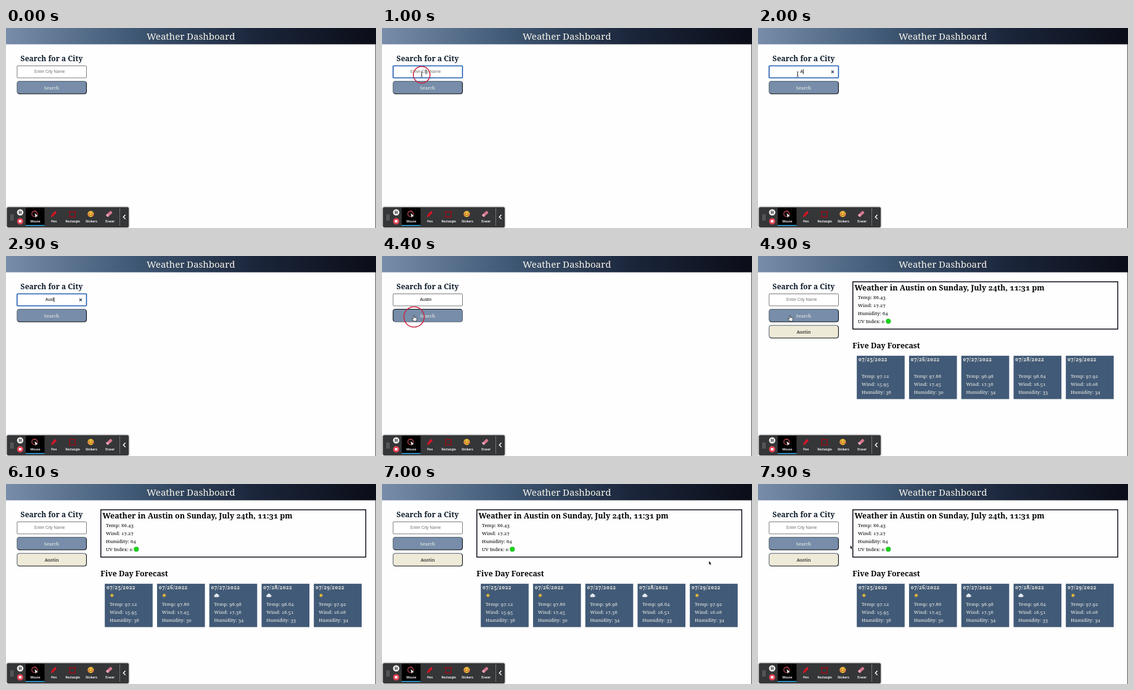
Write an HTML page that moves like this. It is 600 by 325 pixels and loops after 8000 ms.

```html
<!DOCTYPE html>
<html lang="en">
<head>
<meta charset="utf-8">
<title>Weather Dashboard</title>
<style>
  html, body { margin: 0; width: 100%; height: 100%; overflow: hidden; background: #fefefe; }
  svg { display: block; width: 100%; height: 100%; }
  text { white-space: pre; }
  .serif { font-family: "Noto Serif", serif; font-variant-numeric: oldstyle-nums; }
  .sans { font-family: "Liberation Sans", Arial, sans-serif; font-size: 6.75px; }
  .label { font: 500 5.2px Roboto, sans-serif; fill: #fff; }
  .medium { font-weight: 500; }
  .bold { font-weight: 700; }
  .mid { text-anchor: middle; }
  .floating { filter: drop-shadow(0 0 1.5px rgba(0, 0, 0, .6)); }
</style>
</head>
<body>
<svg id="stage" viewBox="0 0 600 325" preserveAspectRatio="none"></svg>
<script>
const LOOP = 8000, STEP = 100;
const INK = '#0b0d18', NAVY = '#0d1b2a', SLATE = '#415a77', STEEL = '#778da9', CREAM = '#eeead8', PALE = '#f7f4ea';
const LIT = '#5a6573', SHADE = '#0b0f14';

const serif = (x, y, size, fill, str, cls = '', extra = '') =>
  `<text class="serif ${cls}" x="${x}" y="${y}" font-size="${size}" fill="${fill}" ${extra}>${str}</text>`;
const rect = (x, y, w, h, fill, extra = '') =>
  `<rect x="${x}" y="${y}" width="${w}" height="${h}" fill="${fill}" ${extra}/>`;
const group = (id, body) => `<g id="${id}">${body}</g>`;

// Rounded button with a two-tone bevelled border
function button(y, fill, color, label, id) {
  const b = y + 20.5;
  return group(id, `
    ${rect(18, y, 112.5, 20.5, fill, 'rx="4"')}
    <g fill="none" stroke-width="1.1">
      <path class="lit" stroke="${LIT}" d="M19.2 ${b - 1.2}Q18 ${b - 2.4} 18 ${b - 4}V${y + 4}Q18 ${y} 22 ${y}H126.5Q128 ${y} 129.3 ${y + 1.2}"/>
      <path class="shade" stroke="${SHADE}" d="M129.3 ${y + 1.2}Q130.5 ${y + 2.4} 130.5 ${y + 4}V${b - 4}Q130.5 ${b} 126.5 ${b}H22Q20.4 ${b} 19.2 ${b - 1.2}"/>
    </g>
    ${serif(74, y + 13.2, 7.5, color, label, 'mid medium')}`);
}

const sun = x => `<g transform="translate(${x} 181)">
  <circle r="2.8" fill="none" stroke="#e8b84a" stroke-width="1" stroke-dasharray=".9 1.3"/>
  <circle r="2" fill="#fcc62c"/></g>`;
const cloud = x => `<g transform="translate(${x} 181)" fill="#e8edf2">
  <circle cx="-2" cy=".9" r="1.9"/><circle cx=".2" cy="-.7" r="2.3"/><circle cx="2.4" cy=".8" r="2"/>
  ${rect(-2, .6, 4.4, 2.2, '#d5dde6')}</g>`;

const days = [
  ['07/25/2022', sun, '97.12', '15.95', 36],
  ['07/26/2022', sun, '97.86', '17.45', 30],
  ['07/27/2022', cloud, '96.98', '17.36', 34],
  ['07/28/2022', cloud, '96.64', '16.51', 33],
  ['07/29/2022', sun, '97.92', '16.08', 34],
];
const cardX = i => 160.2 + i * 84.75;

const cardText = ([date, , temp, wind, hum], i) => {
  const x = cardX(i);
  return serif(x + 2.8, 171.3, 8, PALE, date, 'bold', 'letter-spacing=".5"') +
    [`Temp: ${temp}`, `Wind: ${wind}`, `Humidity: ${hum}`]
      .map((s, k) => serif(x + 7.8, 197.5 + k * 13.1, 7.7, PALE, s, 'medium')).join('');
};

const current = ['Temp: 86.43', 'Wind: 17.27', 'Humidity: 64', 'UV Index: 0']
  .map((s, k) => serif(162, 69.6 + k * 13.1, 7.8, '#000', s, 'medium')).join('') +
  '<circle cx="211.3" cy="106" r="3.8" fill="#18d818" stroke="#0f9a18" stroke-width=".6"/>';

const toolbar = `
  ${rect(1.5, 291.3, 197.5, 32.7, '#353638', 'rx="2" class="floating"')}
  ${rect(32, 292, 30.5, 29, '#000')}${rect(32, 320, 30.5, 1.6, '#2a9fd8')}
  ${[0, 1, 2, 3].map(k => [7.6, 10.6].map(x => rect(x, 303.6 + k * 2.5, 1.2, 1.2, '#ccc')).join('')).join('')}
  <circle cx="23" cy="299.6" r="5.2" fill="#ececec"/>
  ${rect(21, 297.3, 1.3, 4.6, '#222')}${rect(23.7, 297.3, 1.3, 4.6, '#222')}
  <circle cx="23" cy="314" r="5.2" fill="#de4252"/>${rect(20.9, 311.9, 4.2, 4.2, '#fff', 'rx=".5"')}
  <circle cx="46.3" cy="302" r="4.4" fill="none" stroke="#e8555f" stroke-width="1.1"/>
  <path d="M46.3 300.4l6 5.6-2.8.2-1.7 2.4z" fill="#fff" stroke="#000" stroke-width=".4"/>
  <path d="M73 307.2l1-3.8 5.4-5.8 2.8 2.5-5.6 5.9z" fill="#e01828"/><path d="M75.6 304.9l4-4.3" stroke="#7a0810" stroke-width=".7"/>
  <rect x="103.4" y="298.5" width="8.6" height="8.2" fill="none" stroke="#a80614" stroke-width="1.2"/>
  ${[102.4, 111].map(x => [297.5, 305.7].map(y => rect(x, y, 2, 2, '#a80614')).join('')).join('')}
  <circle cx="137.4" cy="302.3" r="5" fill="#f4bd3c"/>
  <path d="M134 301.3q1.2-1.5 2.4 0m2 0q1.2-1.5 2.4 0" stroke="#5c3a10" stroke-width=".8" fill="none"/>
  <path d="M134.8 303.6q2.6 2.6 5.2 0" stroke="#7a4a14" stroke-width=".9" fill="none"/>
  <circle cx="133.8" cy="303.5" r="1.2" fill="#e8684a"/><circle cx="141" cy="303.5" r="1.2" fill="#e8684a"/>
  <g transform="rotate(-42 167.3 302)">${rect(162, 299.8, 10.6, 4.6, '#d9788f', 'rx=".8"')}${rect(162, 299.8, 3, 4.6, '#eba9b8', 'rx=".8"')}</g>
  ${['Mouse', 'Pen', 'Rectangle', 'Stickers', 'Eraser'].map((s, i) =>
    `<text class="label mid" x="${47.5 + i * 30.3}" y="316">${s}</text>`).join('')}
  ${rect(184.2, 293, .8, 28, '#8a8a8a')}
  <path d="M193.6 303.6l-3.3 3.4 3.3 3.4" fill="none" stroke="#fff" stroke-width="1.4"/>`;

const stage = document.getElementById('stage');
stage.innerHTML = `
  <defs><linearGradient id="sky">
    ${[STEEL, SLATE, '#1b263b', INK].map((c, i) => `<stop offset="${i / 3}" stop-color="${c}"/>`).join('')}
  </linearGradient></defs>
  ${rect(0, 0, 600, 325, '#fefefe')}${rect(599, 0, 1, 325, '#4a4d52')}
  ${rect(0, 0, 600, 26.5, 'url(#sky)')}
  ${serif(299.7, 18.6, 15, PALE, 'Weather Dashboard', 'mid')}
  ${serif(74, 54.2, 12, NAVY, 'Search for a City', 'mid bold')}
  <rect id="field" x="18" y="61.5" width="112.5" height="19.5" rx="1" fill="#fff"/>
  <text id="hint" class="sans mid" x="70.8" y="73.4" fill="#757575">Enter City Name</text>
  <text id="typed" class="sans mid" x="70.8" y="73.4" fill="#000"></text>
  <rect id="caret" y="67" width=".8" height="8" fill="#000"/>
  <path id="clear" d="M119 69.2l4 4m0-4l-4 4" stroke="#34496b" stroke-width="1.3"/>
  ${button(86.5, STEEL, PALE, 'Search', 'search')}
  ${group('results', `
    ${button(112.8, CREAM, '#000', 'Austin', 'recent')}
    <rect id="panel" x="153.8" y="41.9" width="429.6" fill="none" stroke="${INK}" stroke-width="1.5"/>
    ${serif(156.5, 55.7, 12.45, '#000', 'Weather in Austin on Sunday, July 24th, 11:31 pm', 'bold')}
    ${group('forecast', serif(153.3, 97.2, 12.3, '#000', 'Five Day Forecast', 'bold') +
      days.map((_, i) => `<rect class="card" x="${cardX(i)}" y="109.3" width="77.6" fill="${SLATE}"/>`).join(''))}
    ${group('data', current + days.map(cardText).join(''))}
    ${group('icons', days.map((d, i) => d[1](cardX(i) + 11.6)).join(''))}`)}
  ${toolbar}
  <circle id="ring" fill="none" stroke="#cc2440" stroke-width="1.5"/>
  <path id="beam" d="M-1.8 -4q1.8 0 1.8 1.2v6q0 1.2 -1.8 1.2m3.6 0q-1.8 0 -1.8 -1.2v-6q0 -1.2 1.8 -1.2M-1 1.2h2" fill="none" stroke="#333" stroke-width=".7"/>
  <path id="hand" d="M-1.6 -4.4q.9 -.9 1.6 .1v2.6l3 .7q1.2 .4 1 1.8l-.7 3.6h-4.4l-2.6 -3.6q.3 -1.4 2.1 -.1z" fill="#fff" stroke="#111" stroke-width=".7" stroke-linejoin="round"/>
  <path id="arrow" d="M0 0v6.2l1.5-1.3 1.1 2.3 1.2-.6-1.1-2.2h2z" fill="#111" stroke="#fff" stroke-width=".5"/>`;

const el = {};
stage.querySelectorAll('[id]').forEach(n => el[n.id] = n);
const cards = stage.querySelectorAll('.card');
const bevel = ['.lit', '.shade'].map(s => el.search.querySelector(s));

const typing = [[0, ''], [1900, 'A'], [2300, 'Au'], [2400, 'Aus'], [2600, 'Aust'],
  [3200, 'Austi'], [3400, 'Austin'], [4600, '']];
const rings = { 900: [64.3, 76, 17], 1000: [64.3, 76, 13.5], 4400: [52, 99, 16.5], 4500: [52, 99, 13.5] };

// Pointer legs: [shape, end time, points of time, x, y]
const legs = [
  ['arrow', 700, [[100, 575, 318], [300, 330, 205], [500, 130, 110], [700, 66, 78]]],
  ['beam', 2900, [[700, 64.3, 75]]],
  ['hand', 6100, [[3900, 58, 93], [4000, 52.5, 101.5]]],
  ['arrow', 8000, [[6400, 62, 98], [6600, 160, 62], [6800, 330, 80], [7000, 530, 125], [7200, 565, 195],
    [7400, 500, 222], [7600, 330, 205], [7800, 180, 128], [7900, 149.6, 99.6]]],
];

const show = (node, on) => node.setAttribute('visibility', on ? 'inherit' : 'hidden');
const within = (t, a, b) => t >= a && t < b;

function along(points, t) {
  const next = points.findIndex(p => p[0] > t);
  if (next < 0) return points[points.length - 1].slice(1);
  const [a, b] = [points[next - 1], points[next]];
  const k = (t - a[0]) / (b[0] - a[0]);
  return [a[1] + (b[1] - a[1]) * k, a[2] + (b[2] - a[2]) * k];
}

function drawField(t) {
  const word = typing.filter(s => s[0] <= t).pop()[1];
  const focused = within(t, 900, 4400);
  el.typed.textContent = word;
  show(el.hint, !word);
  show(el.clear, word && focused);
  show(el.caret, focused && !within(t, 1400, 1900) && t < 3900);
  el.caret.setAttribute('x', word ? 70.8 + el.typed.getComputedTextLength() / 2 : 70.8);
  el.field.setAttribute('stroke', focused ? '#1f5cb4' : '#7c7c7c');
  el.field.setAttribute('stroke-width', focused ? 1.6 : 1);
}

function drawResults(t) {
  const loaded = t >= 4900;
  show(el.results, t >= 4600);
  show(el.data, loaded);
  show(el.icons, t >= 5000);
  el.panel.setAttribute('height', loaded ? 76.8 : 24.2);
  el.forecast.setAttribute('transform', `translate(0 ${loaded ? 52.8 : 0})`);
  cards.forEach(c => c.setAttribute('height', loaded ? 70.4 : 9.8));
}

function drawPointer(t) {
  ['arrow', 'beam', 'hand'].forEach(n => show(el[n], false));
  const leg = legs.find(([, end, pts]) => within(t, pts[0][0], end));
  if (leg) {
    show(el[leg[0]], true);
    el[leg[0]].setAttribute('transform', `translate(${along(leg[2], t)})`);
  }
  const ring = rings[t];
  show(el.ring, ring);
  if (ring) ['cx', 'cy', 'r'].forEach((a, i) => el.ring.setAttribute(a, ring[i]));
  const pressed = within(t, 4400, 4600);
  bevel.forEach((b, i) => b.setAttribute('stroke', pressed === !i ? SHADE : LIT));
}

const start = performance.now();
function frame() {
  const t = Math.floor(((performance.now() - start) % LOOP) / STEP) * STEP;
  drawField(t);
  drawResults(t);
  drawPointer(t);
  requestAnimationFrame(frame);
}
frame();
</script>
</body>
</html>
```
